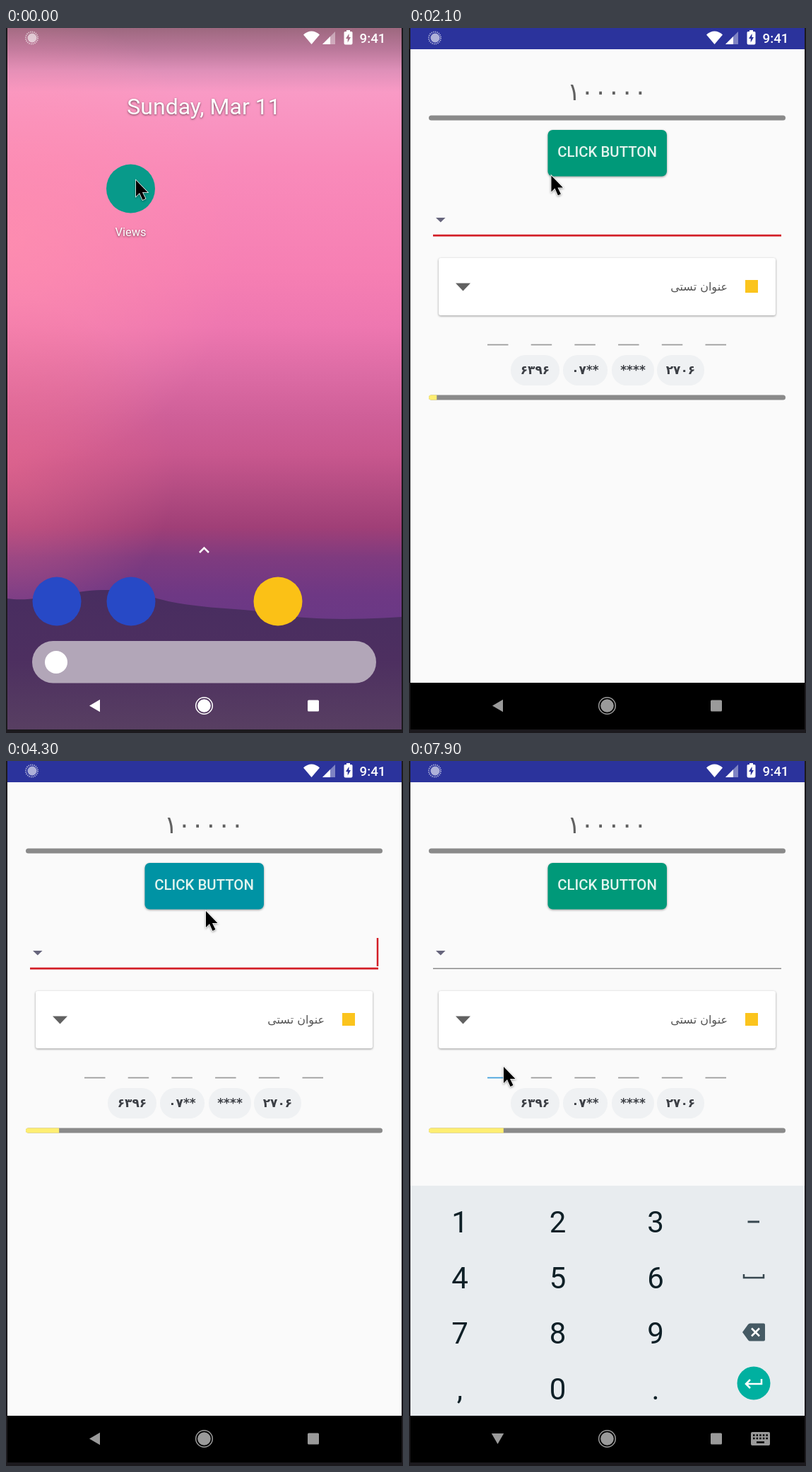
Animation, 562 px wide and 996 px high, one loop 8 s. Source, as an HTML page:

```html
<!DOCTYPE html>
<html lang="en">
<head>
<meta charset="utf-8">
<style>
html, body { margin: 0; width: 100%; height: 100%; overflow: hidden; background: #1c1a1e; }
svg { display: block; width: 562px; height: 996px; }
text { font-family: Roboto, "Noto Sans", sans-serif; text-anchor: middle; }
.fa { font-family: "DejaVu Sans", sans-serif; }
.line { fill: none; stroke-width: 2.5; }
.home text { fill: #fff; text-shadow: 0 1px 3px rgba(0,0,0,.55); }
.raised { filter: drop-shadow(0 1px 1.5px rgba(0,0,0,.4)); }
.keys text { font-size: 42px; fill: #0f2027; }
</style>
</head>
<body>
<svg viewBox="0 0 562 996">
  <defs>
    <linearGradient id="sky" x2="0" y2="860" gradientUnits="userSpaceOnUse">
      <stop offset="0" stop-color="#9d687f"/>
      <stop offset=".035" stop-color="#ba789a"/>
      <stop offset=".07" stop-color="#df90b9"/>
      <stop offset=".105" stop-color="#f99ac5"/>
      <stop offset=".23" stop-color="#f98aba"/>
      <stop offset=".4" stop-color="#f67fb3"/>
      <stop offset=".49" stop-color="#ee77b0"/>
      <stop offset=".57" stop-color="#dc6ba4"/>
      <stop offset=".64" stop-color="#cf5f98"/>
      <stop offset=".7" stop-color="#c8578e"/>
      <stop offset=".77" stop-color="#b04a80"/>
      <stop offset=".82" stop-color="#a03f77"/>
      <stop offset=".87" stop-color="#7f3b7f"/>
      <stop offset=".93" stop-color="#6e3884"/>
      <stop offset="1" stop-color="#683986"/>
    </linearGradient>
    <radialGradient id="warm" cx="0" cy="300" r="330" gradientUnits="userSpaceOnUse">
      <stop offset="0" stop-color="#ff8fae" stop-opacity=".75"/>
      <stop offset="1" stop-color="#ff8fae" stop-opacity="0"/>
    </radialGradient>
    <radialGradient id="glow" cx="0" cy="620" r="240" gradientUnits="userSpaceOnUse">
      <stop offset="0" stop-color="#ea6a8e" stop-opacity=".6"/>
      <stop offset="1" stop-color="#ea6a8e" stop-opacity="0"/>
    </radialGradient>
    <linearGradient id="hill" x2="0" y2="1">
      <stop offset="0" stop-color="#482d60"/>
      <stop offset=".5" stop-color="#4d2f60"/>
      <stop offset="1" stop-color="#583f62"/>
    </linearGradient>
    <clipPath id="reveal"><rect id="hole"/></clipPath>
  </defs>

  <g class="home">
    <path d="M2 0h558v991H2z" fill="url(#sky)"/>
    <path d="M2 0h558v991H2z" fill="url(#warm)"/>
    <path d="M2 0h558v991H2z" fill="url(#glow)"/>
    <path d="M2 806C40 812 90 795 135 794S190 800 230 810C290 822 340 819 385 828S500 836 560 832V991H2z" fill="url(#hill)"/>
    <text x="280" y="122" font-size="32">Sunday, Mar 11</text>
    <circle cx="176.5" cy="227" r="34.5" fill="#089a8a"/>
    <text x="176.5" y="294" font-size="16.5">Views</text>
    <path d="M274 741l6.5-6.5 6.5 6.5" class="line" stroke="#fff"/>
    <circle cx="72" cy="810" r="34.5" fill="#2749c6"/>
    <circle cx="177" cy="810" r="34.5" fill="#2749c6"/>
    <circle cx="385" cy="810" r="34.5" fill="#fbc116"/>
    <rect x="37" y="866" width="487" height="59.5" rx="29.7" fill="#b2a6b8"/>
    <circle cx="71" cy="896" r="16" fill="#fff"/>
  </g>

  <g clip-path="url(#reveal)">
    <g id="app">
      <path d="M2 0h558v991H2z" fill="#fafafa"/>
      <path d="M2-9h558v39H2z" fill="#2b339c"/>
      <path d="M2 925h558v66H2z"/>
      <g id="content">
        <text class="fa" x="280.5" y="102" font-size="35" fill="#616161">۱۰۰۰۰۰</text>
        <rect x="28" y="123.500" width="505" height="7" rx="3.500" fill="#8a8a8a"/>
        <rect id="button" class="raised" x="196.500" y="144" width="168.500" height="65.500" rx="7"/>
        <text x="280.5" y="182" font-size="20.4" font-weight="500" fill="#e2f4ee">CLICK BUTTON</text>
        <path d="M38 268h13.500l-6.700 6.500z" fill="#66657c"/>
        <path id="underline" d="M34 293.200H527"/>
        <path id="caret" d="M526 250v40" class="line" stroke="#d31d26"/>
        <rect class="raised" x="42" y="325" width="477" height="81" rx="3" fill="#fff"/>
        <path d="M66 360.500h21l-10.500 11z" fill="#616161"/>
        <text class="fa" x="451" y="371" font-size="16" fill="#555" style="text-anchor:end">عنوان تستی</text>
        <rect x="476" y="356" width="18" height="18" fill="#fbc41d"/>
        <g id="pins"></g>
        <g id="chips"></g>
        <rect x="28" y="518.500" width="505" height="7" rx="3.500" fill="#8a8a8a"/>
        <path id="bar" fill="#ffee72"/>
      </g>
      <g id="board" class="keys">
        <path d="M2 600h558v325H2z" fill="#e8ecef"/>
        <g id="keys"></g>
        <g class="line" stroke="#37474f">
          <path d="M479.500 651h16.500" stroke-width="3"/>
          <path d="M474 725v5h28v-5"/>
        </g>
        <path d="M472 807l8-11q1-1.500 3-1.500h19q2 0 2 2v21q0 2-2 2h-19q-2 0-3-1.500z" fill="#455a64"/>
        <path d="M485 801.500l11 11m0-11l-11 11" class="line" stroke="#fff"/>
        <circle cx="488" cy="879" r="23.500" fill="#00b0a0"/>
        <path d="M499 873v7H477m6-6l-6 6 6 6" class="line" stroke="#fff"/>
      </g>
      <path d="M2 925h558v66H2z"/>
    </g>
  </g>

  <g fill="#fff">
    <circle cx="37" cy="14" r="6.500" opacity=".62"/>
    <circle cx="36.500" cy="14" r="8.500" fill="none" stroke="#fff" stroke-width="2" stroke-dasharray="1.400 1.270" opacity=".6"/>
    <path d="M421 9.500Q432.500-.5 444 9.500L432.500 23z"/>
    <path d="M448 23L466 5V23z" opacity=".4"/>
    <path d="M448 23L459 12V23z"/>
    <path d="M482 3h5v2h2q1.500 0 1.500 1.500v15q0 2-2 2h-8q-2 0-2-2v-15q0-1.500 1.500-1.500h2z"/>
    <path id="bolt" d="M485.500 8l-4.500 7h2.700v5.500l4.300-7.500h-2.500z"/>
    <text x="519" y="21" font-size="18.700" font-weight="500">9:41</text>
  </g>

  <g id="nav">
    <path id="back" d="M118 957.500l15-8.700v17.400z"/>
    <circle cx="280.500" cy="957.500" r="9.300"/>
    <circle cx="280.500" cy="957.500" r="11.800" fill="none" stroke="currentColor" stroke-width="1.500"/>
    <rect x="427" y="949.500" width="16" height="16" rx="1.500"/>
    <g id="switcher">
      <rect x="484" y="948" width="27" height="19" rx="2"/>
      <path d="M487 952.500h21m-21 4.500h21" stroke="#000" stroke-width="2.500" stroke-dasharray="2.500 2.100"/>
      <path d="M492 962.500h11" stroke="#000" stroke-width="2.500"/>
    </g>
  </g>
  <path id="mouse" class="raised" d="M0 0V23l5-5 4.500 10 4-2L9 17h7.500z" stroke="#fff" stroke-width="1.500" paint-order="stroke"/>
</svg>

<script>
const $ = id => document.getElementById(id);
const set = (id, attrs) => {
  for (const name in attrs) $(id).setAttribute(name, attrs[name]);
};
const show = (id, on) => set(id, { visibility: on ? 'inherit' : 'hidden' });
const clamp = x => Math.min(1, Math.max(0, x));
const lerp = (a, b, p) => a + (b - a) * p;
const part = (t, from, to) => clamp((t - from) / (to - from));
const smooth = p => p * p * (3 - 2 * p);

$('pins').innerHTML = Array.from({ length: 6 }, (_, i) =>
  `<path d="M${111 + i * 61.7} 447.500h29.500" stroke="#999" stroke-width="1.700"/>`).join('');

$('chips').innerHTML = [[144, 69, '۶۳۹۶'], [218, 63, '۰۷**'], [287, 60, '****'], [351, 67, '۲۷۰۶']]
  .map(([x, w, label]) =>
    `<rect x="${x}" y="462" width="${w}" height="43" rx="21" fill="#eff1f3"/>
     <text class="fa" x="${x + w / 2}" y="489" style="font-size:17px;font-weight:bold;fill:#3c3f45">${label}</text>`).join('');

$('keys').innerHTML = [...'123456789,0.'].map((key, i) =>
  `<text x="${72 + i % 3 * 138.5}" y="${666 + Math.floor(i / 3) * 78.6}">${key}</text>`).join('');

// Pointer stops: time, x, y
const stops = [[0, 184, 215], [1900, 184, 215], [2800, 321, 163], [3400, 321, 163],
  [4200, 283, 212], [4700, 283, 212], [6300, 148, 432], [6700, 148, 432],
  [7000, 134, 432], [8000, 134, 432]];

function pointer(t) {
  const i = stops.findIndex(s => s[0] > t);
  const [t0, x0, y0] = stops[i - 1], [t1, x1, y1] = stops[i];
  const p = smooth(part(t, t0, t1));
  return `translate(${lerp(x0, x1, p)} ${lerp(y0, y1, p)})`;
}

function draw(t) {
  // App window grows out of its launcher icon
  const p = 1 - (1 - part(t, 1050, 1550)) ** 2.54;
  const wide = clamp(p * 1.4);
  const left = lerp(142, 2, wide), top = lerp(192, 0, p);
  set('hole', {
    x: left, y: top, rx: 34 * (1 - wide),
    width: t < 1050 ? 0 : lerp(211, 560, wide) - left,
    height: lerp(220, 991, p) - top
  });
  set('app', { transform: `translate(0 ${41 * (1 - p)})` });
  show('content', t >= 1600);

  const typing = t >= 7100;
  const pressed = part(t, 3400, 3550) - part(t, 4600, 4800);
  const mix = (a, b) => Math.round(lerp(a, b, pressed));
  set('button', { fill: `rgb(0,${mix(153, 147)},${mix(121, 164)})` });
  set('underline', { stroke: typing ? '#8c8c8c' : '#d31d26', 'stroke-width': typing ? 1.6 : 2.7 });
  show('caret', t >= 1600 && !typing && (t + 800) % 1000 < 500);
  $('pins').firstChild.setAttribute('stroke', typing ? '#3d9edb' : '#999');

  const end = 28 + Math.max(0, .0163 * (t - 1410));
  set('bar', { d: `M${end} 518.500H31.500a3.500 3.500 0 0 0 0 7H${end}z` });

  const rise = 1 - (1 - part(t, 7150, 7400)) ** 2;
  set('board', { transform: `translate(0 ${325 * (1 - rise)})` });
  show('board', typing);
  show('switcher', t >= 7250);
  set('back', { transform: t >= 7250 ? 'rotate(-90 125.500 957.500)' : '' });

  const shade = t < 1450 ? '#fff' : '#9a9a9a';
  set('nav', { fill: shade, color: shade });
  set('bolt', { fill: t < 1450 ? '#a87089' : '#2b339c' });
  set('mouse', { transform: pointer(t) });
}

function tick() {
  draw(performance.now() % 8000);
  requestAnimationFrame(tick);
}
tick();
</script>
</body>
</html>
```
